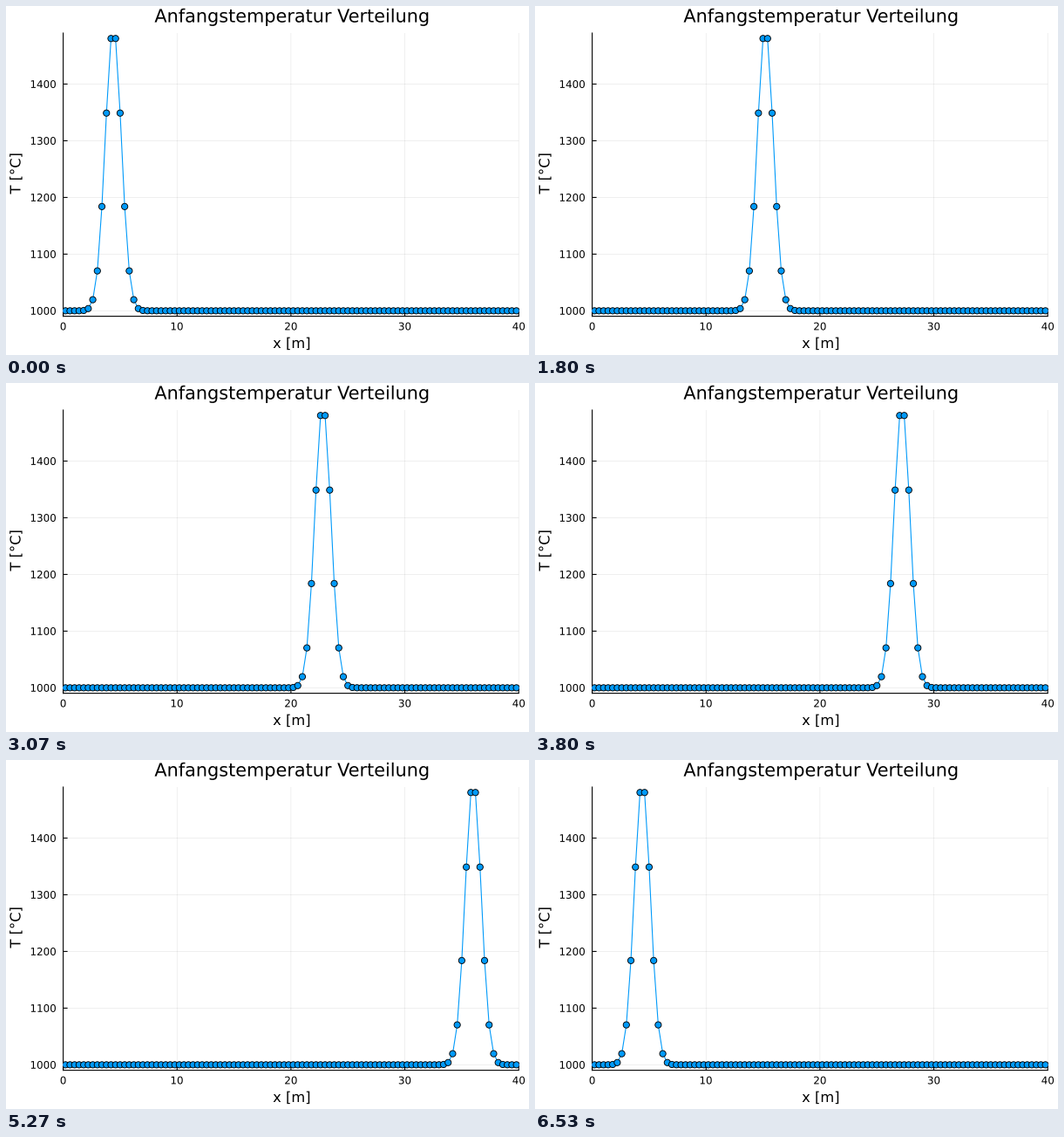
A matplotlib script that plays this animation: 600x400 px, repeating every 6.59 s.

```python
import numpy as np
import matplotlib.pyplot as plt
from matplotlib.animation import FuncAnimation
from matplotlib.collections import LineCollection
from matplotlib.patches import PathPatch, Rectangle
from matplotlib.textpath import TextPath
from matplotlib.transforms import Affine2D

W, H, DPI = 600, 400, 100
PT = 72 / DPI
LEFT, RIGHT, TOP, BOTTOM = 65.6, 588.2, 31, 355.6
LOOP_MS, TICK_MS, FPS = 6590, 10, 15
CELLS, LENGTH = 100, 40
BLUE = "#009afa"

dx = LENGTH / CELLS
x = (np.arange(CELLS) + 0.5) * dx
start = 1000 + 500 * np.exp(-(x - 4.4) ** 2)
pad = 0.02 * (start.max() - 1000)
t_lo, t_hi = 1000 - pad, start.max() + pad


def to_px(pos):
    return LEFT + pos / LENGTH * (RIGHT - LEFT)


def to_py(temp):
    return BOTTOM - (temp - t_lo) / (t_hi - t_lo) * (BOTTOM - TOP)


def temperature(step):
    """Pulse carried one cell per step, periodic over the inner cells."""
    inner = np.roll(start[1:-1], step)
    return np.concatenate(([inner[-1]], inner, [inner[-1]]))


# One axes in pixel units, y pointing down
fig = plt.figure(figsize=(W / DPI, H / DPI), dpi=DPI, facecolor="white")
ax = fig.add_axes([0, 0, 1, 1], xlim=(0, W), ylim=(H, 0))
ax.axis("off")


def strokes(segments, width, cap="butt", **kw):
    lines = LineCollection(segments, colors="black", linewidths=width * PT,
                           capstyle=cap, **kw)
    lines.set_snap(False)
    ax.add_collection(lines, autolim=False)


def label(px, baseline, text, size, align=0.5, angle=0):
    """Text outline; align is the share of its width left of the anchor."""
    path = TextPath((0, 0), text, size=size, prop="DejaVu Sans")
    box = path.get_extents()
    place = (Affine2D().translate(-box.x0 - align * box.width, 0)
             .scale(1, -1).rotate_deg(-angle).translate(px, baseline))
    ax.add_patch(PathPatch(place.transform_path(path), facecolor="black",
                           linewidth=0, snap=False))


xs = [(to_px(v), str(v)) for v in range(0, 41, 10)]
ys = [(to_py(v), str(v)) for v in range(1000, 1401, 100)]

strokes([[(px, TOP), (px, BOTTOM)] for px, _ in xs]
        + [[(LEFT, py), (RIGHT, py)] for py, _ in ys], 0.6, alpha=0.1)
strokes([[(LEFT, TOP), (LEFT, BOTTOM)], [(LEFT, BOTTOM), (RIGHT, BOTTOM)]],
        1.1, cap="projecting")
strokes([[(px, BOTTOM), (px, BOTTOM - 5)] for px, _ in xs]
        + [[(LEFT, py), (LEFT + 5, py)] for py, _ in ys], 1.1)

for px, text in xs:
    label(px, 371.4, text, 11.9)
for py, text in ys:
    label(57, py + 4.4, text, 11.9, align=1)
mid = (LEFT + RIGHT) / 2 + 0.5
label(mid, 18.6, "Anfangstemperatur Verteilung", 20.8)
label(mid, 392, "x [m]", 16.3)
label(16.5, 192.5, "T [°C]", 16.3, angle=90)

clip = Rectangle((LEFT - 0.5, TOP - 0.5), RIGHT - LEFT + 1, BOTTOM - TOP + 1,
                 transform=ax.transData)
px = to_px(x)
line, = ax.plot(px, to_py(start), color=BLUE, linewidth=1.1 * PT, zorder=3)
dots = ax.scatter(px, to_py(start), s=np.full(CELLS, (7.2 * PT) ** 2),
                  color=BLUE, edgecolors="black", linewidths=0.9 * PT,
                  zorder=4)
for artist in (line, dots):
    artist.set_clip_path(clip)
ax.set(xlim=(0, W), ylim=(H, 0))


def update(tick):
    # Steps run at FPS, rounded to the nearest tick
    step = int((tick + 0.5) * TICK_MS * FPS / 1000)
    py = to_py(temperature(step))
    line.set_ydata(py)
    dots.set_offsets(np.column_stack((px, py)))
    return line, dots


anim = FuncAnimation(fig, update, frames=LOOP_MS // TICK_MS,
                     interval=TICK_MS, repeat=True, repeat_delay=0)
plt.show()
```
